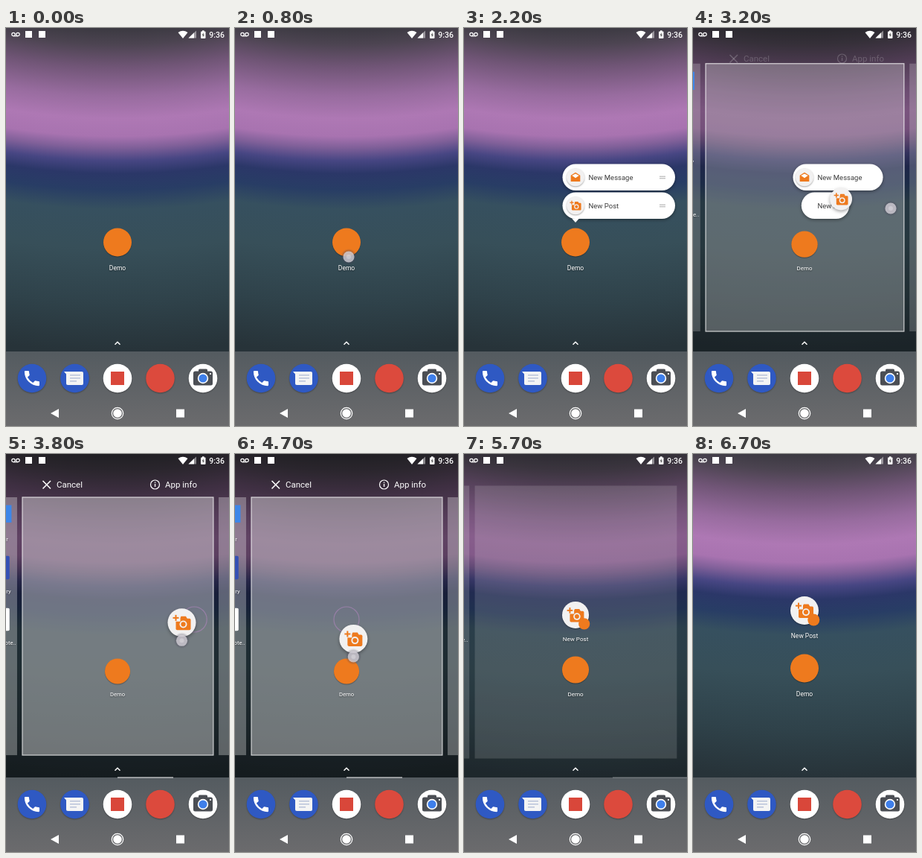
Recreate the animation shown at these times as an HTML page with a canvas. Size 300 px wide and 534 px high, loop 6800 ms.

```html
<!DOCTYPE html>
<html lang="en">
<head>
<meta charset="utf-8">
<title>Pinning a shortcut</title>
<style>
html, body { margin: 0; width: 100%; height: 100%; overflow: hidden; background: #333c44; }
canvas { display: block; width: 300px; height: 534px; }
</style>
</head>
<body>
<canvas id="stage"></canvas>
<script>
const W = 300, H = 534, LOOP = 6800;
const ORANGE = '#ee7a1e', BLUE = '#2f59c3', PLATE = '#f2f1f1';
const canvas = document.getElementById('stage');
const ratio = window.devicePixelRatio || 1;
canvas.width = W * ratio;
canvas.height = H * ratio;
const c = canvas.getContext('2d');

// Key moments in ms
const PRESS = 500, OPEN = 1050, RELEASE = 1700;
const GRAB = 2500, DRAG = 3074, DROP = 4800, LANDED = 5100, LEAVE = 5450;

const ramp = (t, a, b) => Math.min(1, Math.max(0, (t - a) / (b - a)));
const mix = (a, b, k) => a + (b - a) * k;
const easeOut = k => 1 - (1 - k) ** 2;
const easeInOut = k => k * k * (3 - 2 * k);
const pulse = (t, a, b, fadeIn, fadeOut) => ramp(t, a, a + fadeIn) * (1 - ramp(t, b, b + fadeOut));

function gradient(g, stops) {
  for (const [at, colour] of stops) g.addColorStop(at, colour);
  return g;
}

// Centre far above the stage: the colour bands sag slightly in the middle
const FAR = 800;
const wallpaper = gradient(c.createRadialGradient(150, -FAR, FAR, 150, -FAR, FAR + 434), [
  [0, '#3b3941'], [.05, '#4c4451'], [.12, '#705576'], [.21, '#986c9f'], [.28, '#ae78b4'],
  [.335, '#a873b0'], [.37, '#806099'], [.41, '#474683'], [.45, '#2b3768'], [.5, '#283d65'],
  [.56, '#36505f'], [.68, '#374f59'], [.85, '#2f424a'], [1, '#273339']]);
const dockFill = gradient(c.createLinearGradient(0, 434, 0, H), [[0, '#545b60'], [1, '#6b6b6d']]);

const fade = (alpha, draw) => {
  if (alpha <= 0) return;
  c.save();
  c.globalAlpha *= alpha;
  draw();
  c.restore();
};

function rect(x, y, w, h, fill) {
  c.fillStyle = fill;
  c.fillRect(x, y, w, h);
}

function rounded(x, y, w, h, r, fill) {
  c.beginPath();
  c.roundRect(x, y, w, h, r);
  c.fillStyle = fill;
  c.fill();
}

function disc(x, y, r, fill) {
  c.beginPath();
  c.arc(x, y, r, 0, Math.PI * 2);
  c.fillStyle = fill;
  c.fill();
}

function ring(x, y, r, colour, width = 1) {
  c.beginPath();
  c.arc(x, y, r, 0, Math.PI * 2);
  c.strokeStyle = colour;
  c.lineWidth = width;
  c.stroke();
}

function trace(points, close) {
  c.beginPath();
  points.forEach(([x, y]) => c.lineTo(x, y));
  if (close) c.closePath();
}

function polygon(points, fill) {
  trace(points, true);
  c.fillStyle = fill;
  c.fill();
}

function line(points, colour, width) {
  trace(points);
  c.strokeStyle = colour;
  c.lineWidth = width;
  c.stroke();
}

function text(str, x, y, size, align = 'left', fill = '#fff', weight = 400) {
  c.font = `${weight} ${size}px Roboto, sans-serif`;
  c.textAlign = align;
  c.fillStyle = fill;
  c.fillText(str, x, y);
}

function shadow(blur, y, alpha = .35) {
  c.shadowColor = `rgba(0,0,0,${alpha})`;
  c.shadowBlur = blur * ratio;
  c.shadowOffsetY = y * ratio;
}

function shadowed(blur, y, alpha, draw) {
  c.save();
  shadow(blur, y, alpha);
  draw();
  c.restore();
}

function statusBar() {
  for (const x of [10, 16]) ring(x, 8.5, 2.2, '#fff', 1.2);
  rect(10, 10.2, 6, 1.2, '#fff');
  rect(26, 4, 9, 9, '#fff');
  rect(44, 4, 9, 9, '#fff');
  c.beginPath();
  c.moveTo(238, 14);
  c.lineTo(231.5, 6);
  c.quadraticCurveTo(238, 1.5, 244.5, 6);
  c.fillStyle = '#fff';
  c.fill();
  polygon([[245.5, 13.5], [256, 13.5], [256, 3.5]], 'rgba(255,255,255,.45)');
  polygon([[245.5, 13.5], [253, 13.5], [253, 6.3]], '#fff');
  rounded(262, 4.5, 6.5, 9.5, 1, '#fff');
  rect(264, 3.3, 2.5, 2, '#fff');
  polygon([[265.8, 6], [263.6, 9.8], [265, 9.8], [264.7, 12.6], [267, 8.8], [265.6, 8.8]], '#555');
  text('9:36', 294, 12.7, 10.5, 'right', '#fff', 500);
}

const handset = new Path2D('M6.6 10.8q2.2 4.4 6.6 6.6l2.2-2.2q.5-.5 1-.2 1.7.6 3.6.6 1 0 1 1v3.5q0 1-1 1' +
  'a17 17 0 0 1-17-17q0-1 1-1h3.5q1 0 1 1 0 1.9.6 3.6.2.6-.3 1z');

function dock() {
  rect(0, 434, W, 100, dockFill);
  const plates = [[35, BLUE], [92.5, BLUE], [150, '#fff'], [207.5, '#dc4a3d'], [265, '#fff']];
  for (const [x, fill] of plates) shadowed(2, 1, .3, () => disc(x, 470, 19.3, fill));

  c.save();
  c.translate(21.5, 456.5);
  c.scale(1.12, 1.12);
  c.fillStyle = '#fff';
  c.fill(handset);
  c.restore();

  rounded(81, 461, 23, 18, 2, '#f4f4f4');
  polygon([[78, 461], [86, 461], [86, 470]], '#f4f4f4');
  for (const [y, w] of [[465, 14], [469, 14], [473, 9]]) rect(86, y, w, 1.5, '#b9c3da');

  rect(141, 461, 18, 18, '#d9473a');

  rounded(252, 460.5, 26, 19, 2.5, '#4b4e54');
  rounded(259, 457.5, 12, 6, 1.5, '#4b4e54');
  disc(265, 470, 7.2, '#fff');
  disc(265, 470, 5.6, '#3f7fea');
  rect(274, 463, 2, 2, '#fff');

  polygon([[60, 517], [71, 511], [71, 523]], '#fff');
  disc(150, 517, 5.8, '#fff');
  ring(150, 517, 7.7, '#fff', 1.2);
  rect(229, 511.5, 11, 11, '#fff');
}

// Camera glyph with a plus, drawn for a plate of radius 19
function cameraGlyph(hole) {
  rounded(-8, -5.5, 20, 15.5, 1.8, ORANGE);
  polygon([[-3, -5], [-1, -8.5], [5.5, -8.5], [7.5, -5]], ORANGE);
  disc(2, 2.2, 5, hole);
  disc(2, 2.2, 3.1, ORANGE);
  rect(-9.5, -8, 7.5, 6.5, hole);
  rect(-12, -7.4, 8, 2, ORANGE);
  rect(-9, -10.4, 2, 8, ORANGE);
}

function envelopeGlyph() {
  polygon([[-10, -4], [0, -10.5], [10, -4], [10, 9], [-10, 9]], ORANGE);
  polygon([[-7.5, -3.5], [0, -7.5], [7.5, -3.5], [0, 1.5]], '#fff');
}

function shortcutIcon(x, y, r, glyph, lift = 2) {
  c.save();
  c.translate(x, y);
  c.scale(r / 19, r / 19);
  shadowed(lift, lift / 2, .35, () => disc(0, 0, 19, PLATE));
  glyph(PLATE);
  c.restore();
}

function demoIcon(t) {
  const lifted = easeOut(ramp(t, OPEN, OPEN + 150)) * (1 - easeOut(ramp(t, RELEASE, RELEASE + 200)));
  shadowed(1 + 2 * lifted, 1, .3, () => disc(150, 287.5, mix(19, 21.3, lifted), ORANGE));
  if (lifted === 0) label('Demo', 150, 324.5);
}

function label(str, x, y, align = 'center') {
  shadowed(2, 1, .5, () => text(str, x, y, 8.5, align));
}

function panel(x, w, alpha) {
  rect(x, 27.2, w, 385.8, `rgba(255,255,255,${alpha})`);
}

function workspace(t, zoom) {
  const dragging = pulse(t, DRAG, DROP, 80, 200);
  c.save();
  c.translate(150.5, 287.5 + 4 * zoom);
  c.scale(1 - .103 * zoom, 1 - .103 * zoom);
  c.translate(-150.5, -287.5);

  if (zoom > 0) {
    panel(7.2, 286.5, (.28 + .1 * dragging) * zoom);
    panel(-287, 286.4, .3 * zoom);
    panel(301.6, 286, .3 * zoom * dragging);
    fade(dragging, () => {
      c.strokeStyle = 'rgba(255,255,255,.75)';
      c.lineWidth = 1.3;
      c.strokeRect(7.2, 27.2, 286.5, 385.8);
    });
    rect(-36, 39, 27, 26, '#3d86e8');
    rounded(-46, 115, 34, 35, 2, '#3450b4');
    rounded(-46, 193, 34, 34, 2, '#fff');
    label('r', -14, 93, 'right');
    label('ry', -10, 171, 'right');
    label('ote..', -2.2, 248, 'right');
  }

  demoIcon(t);
  if (t >= LANDED) {
    shortcutIcon(150, 210, 19, cameraGlyph);
    disc(162.3, 222.5, 8, ORANGE);
    label('New Post', 150, 247);
  }
  c.restore();
}

function dropBar(t) {
  fade(pulse(t, 3150, DROP, 250, 200), () => {
    line([[49.5, 36], [60, 46.5]], '#fff', 1.6);
    line([[60, 36], [49.5, 46.5]], '#fff', 1.6);
    text('Cancel', 68, 45.2, 11.5);
    ring(200.5, 41, 6, '#fff', 1.2);
    rect(199.9, 37.5, 1.3, 1.4, '#fff');
    rect(199.9, 40, 1.3, 4, '#fff');
    text('App info', 214, 45.2, 11.5);
  });
}

function pageLine(t) {
  const settled = easeOut(ramp(t, DROP + 50, LANDED));
  fade(.65 * pulse(t, 3300, LEAVE, 150, 400), () =>
    rect(mix(150, 200, settled), 433.3, mix(75, 100, settled), 1.5, '#fff'));
}

// A pill that folds toward its icon; fold runs from 0 (open) to 1 (gone)
function pill(y, fold, name, glyph, showIcon) {
  if (fold >= 1) return;
  const left = 132.5 + 33 * fold * fold, right = 284 - 116 * fold;
  const width = Math.max(2, right - left);
  fade(Math.min(1, (1 - fold) * 4), () => {
    shadowed(4, 1.5, .4, () => rounded(left, y, width, 35.5, Math.min(17.7, width / 2), '#fff'));
    c.beginPath();
    c.roundRect(left, y, width, 35.5, Math.min(17.7, width / 2));
    c.clip();
    if (showIcon) shortcutIcon(150, y + 17.8, 12, glyph);
    text(name, 167.5, y + 21.3, 9.5, 'left', '#3c3c3c');
    for (const dy of [16.2, 18.8]) rect(263, y + dy, 8, 1, '#a9a9a9');
  });
}

function popup(t) {
  if (t < OPEN || t > DRAG + 300) return;
  const fold = order => t < DRAG - 20
    ? 1 - easeOut(ramp(t, OPEN + 40 * order, OPEN + 200 + 40 * order))
    : ramp(t, DRAG + 78 * order, DRAG + 200 + 78 * order);
  pill(182.5, fold(1), 'New Message', envelopeGlyph, true);
  pill(220.5, fold(0), 'New Post', cameraGlyph, t < DRAG);
  if (t < DRAG) fade(1 - fold(0), () => polygon([[145, 255.5], [155, 255.5], [150, 261]], '#fff'));
}

function fingerAt(t) {
  if (t < 2100) return [153, 307];
  const k = easeInOut(ramp(t, 3300, 4750));
  return [mix(266, 159, k), mix(242, 272, k)];
}

function draggedIcon(t) {
  if (t < DRAG || t >= LANDED) return;
  const [fx, fy] = fingerAt(t);
  const pick = ramp(t, DRAG, DRAG + 300), land = easeOut(ramp(t, DROP, LANDED));
  const x = mix(mix(150, fx, pick), 150, land);
  const y = mix(mix(238, fy - 24, pick), 222, land);

  const column = Math.max(-2, Math.min(2, Math.round((x - 150) / 51.6)));
  fade(.7 * pulse(t, 3350, DROP, 150, 200), () =>
    ring(150 + 51.6 * column, 222, 17, '#a884b6', 1.2));
  shortcutIcon(x, y, mix(mix(12, 19, pick), 17, land), cameraGlyph, 4);
}

function finger(t) {
  const alpha = pulse(t, PRESS - 50, RELEASE, 50, 100) + pulse(t, GRAB - 50, DROP - 50, 50, 100);
  const [x, y] = fingerAt(t);
  fade(alpha, () => {
    const halo = gradient(c.createRadialGradient(x, y, 5, x, y, 11),
      [[0, 'rgba(70,65,85,.6)'], [1, 'rgba(70,65,85,0)']]);
    disc(x, y, 11, halo);
    disc(x, y, 7.6, 'rgba(222,218,224,.75)');
    disc(x, y, 3, 'rgba(255,255,255,.25)');
  });
}

function draw(t) {
  const zoom = easeOut(ramp(t, DRAG, DRAG + 300)) * (1 - easeInOut(ramp(t, LEAVE, LEAVE + 500)));
  c.setTransform(ratio, 0, 0, ratio, 0, 0);
  rect(0, 0, W, H, wallpaper);
  rect(0, 0, W, H, `rgba(0,0,0,${.45 * zoom})`);
  workspace(t, zoom);
  dock();
  pageLine(t);
  line([[146.5, 424.8], [150, 421.3], [153.5, 424.8]], '#fff', 1.5);
  dropBar(t);
  statusBar();
  popup(t);
  draggedIcon(t);
  finger(t);
}

function tick() {
  draw(performance.now() % LOOP);
  requestAnimationFrame(tick);
}
tick();
</script>
</body>
</html>
```
